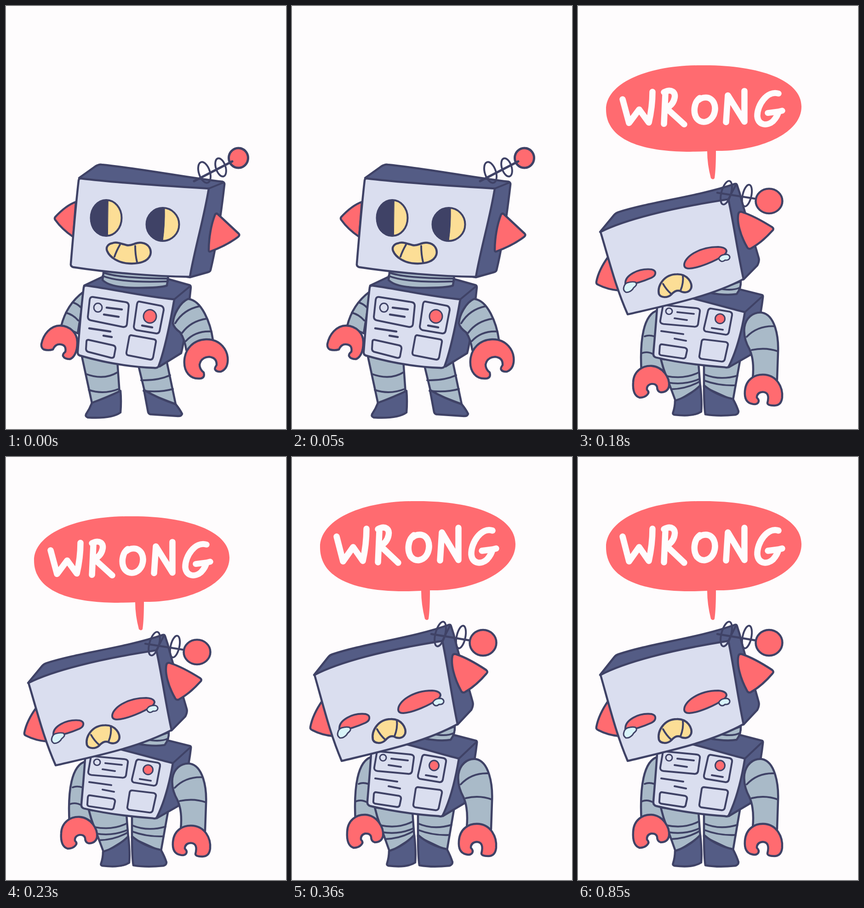
Write an HTML page that moves like this. It is 609 px wide and 920 px high and loops after 1.17 s.

```html
<!DOCTYPE html>
<html lang="en">
<head>
<meta charset="utf-8">
<title>Wrong robot</title>
<style>
html, body { margin: 0; width: 100%; height: 100%; overflow: hidden; background: #fefcfd; }
svg { display: block; width: 100%; height: 100%; }
</style>
</head>
<body>
<svg id="stage" viewBox="0 0 609 920" stroke-linecap="round" stroke-linejoin="round"></svg>
<script>
const ink = '#3f4266', navy = '#545c85', pale = '#dadeef', steel = '#a9bac8',
      red = '#ff6b70', yellow = '#fcde96', tear = '#d9f4f9', paper = '#fefcfd';

const shape = (fill, d, w = 4.5) => `<path d="${d}" fill="${fill}" stroke="${ink}" stroke-width="${w}"/>`;
const line = (d, w = 4) => shape('none', d, w);
const oval = (fill, x, y, rx, ry, tilt = 0, w = 4) =>
  `<ellipse cx="${x}" cy="${y}" rx="${rx}" ry="${ry}" transform="rotate(${tilt} ${x} ${y})" fill="${fill}" stroke="${ink}" stroke-width="${w}"/>`;

const happyLegs = [
  shape(steel, 'M165 762L187 864L247 842L242 770Z'),
  line('M173 800Q212 815 242 797M180 835Q212 846 245 833'),
  shape(navy, 'M187 863Q220 851 249 837Q251 860 249 884Q230 898 178 895Q172 893 174 888Q182 876 187 863Z'),
  shape(steel, 'M288 782L302 840L369 866L350 775Z'),
  line('M294 814Q331 815 357 803M299 837Q335 841 363 833'),
  shape(navy, 'M300 835Q332 854 369 866Q378 877 383 887Q382 892 374 892L314 888Q310 887 309 883Z')
];

const happyBody = [
  shape(steel, 'M168 622C144 640 128 664 120 696L156 712L166 650Z'),
  line('M146 645Q156 648 163 656M130 667Q146 671 157 684'),
  shape(red, 'M82 747Q76 743 77 735C81 715 96 695 118 695C140 696 156 712 155 733C155 752 148 765 139 768Q127 768 124 761Q123 757 129 752Q132 738 119 736Q108 734 102 747Q92 750 82 747Z'),
  shape(navy, 'M170 608L208 590L353 594L399 607Q402 608 402 612C398 650 390 720 381 755L334 784L160 760Z'),
  shape(steel, 'M213 572L210 596C225 611 260 613 290 613Q335 613 350 608L353 586Z'),
  line('M212 580Q245 592 353 593M210 587Q250 603 352 599'),
  shape(pale, 'M174 608C240 617 300 632 366 638C357 690 346 745 332 783Q330 788 322 787C270 785 215 776 160 760Q155 758 156 751C160 700 164 650 169 612Q170 608 174 608Z'),
  line('M366 638L401 609'),
  line('M190 633L260 644Q267 645 267 652L263 692Q262 699 254 698L186 684Q178 683 178 676L182 639Q183 632 190 633Z'),
  line('M291 643L337 652Q343 654 343 661L334 707Q332 713 326 712L284 705Q278 703 278 697L285 648Q286 642 291 643Z'),
  line('M179 726L233 738Q239 740 238 746L235 762Q234 766 228 765L178 752Q174 750 174 746L175 730Q175 726 179 726Z'),
  line('M272 716L322 725Q327 726 326 731L320 764Q318 770 313 769L267 760Q261 759 262 753L268 720Q269 716 272 716Z'),
  line('M219 656L252 660M213 671L245 676M296 695L318 699M181 701L227 708M212 717L230 720', 4.5),
  oval('none', 200, 656, 9, 9.5, 0, 3),
  oval(red, 313, 675, 14, 14.5, 0, 3),
  shape(steel, 'M363 690C364 672 378 645 396 637C426 640 445 690 450 726L392 748Q389 726 379 710Q365 700 363 690Z'),
  line('M368 690Q386 660 421 653M383 711Q402 685 437 680M391 729Q412 706 447 708'),
  shape(red, 'M424 810C400 813 386 795 388 770C390 745 408 726 435 725C465 724 485 748 482 775Q480 790 468 795Q458 796 455 791Q453 788 458 781Q459 765 442 763Q424 764 421 780Q421 790 430 797Q433 808 424 810Z')
];

const happyHead = [
  shape(red, 'M152 426Q130 434 107 459Q105 462 107 465Q122 486 146 502Z'),
  shape(navy, 'M159 374L194 349Q202 344 208 345C300 354 390 373 471 382Q476 384 475 389C468 450 458 520 445 574Q444 578 439 579L400 590L200 560Z'),
  shape(pale, 'M162 375C220 382 340 391 441 397C431 460 410 530 400 589C320 588 225 580 146 568Q140 566 141 560C146 500 152 430 158 379Q159 375 162 375Z'),
  line('M441 397L473 384'),
  oval(yellow, 218, 461, 33.5, 39, 0, 0),
  shape(ink, 'M222 422C196 418 184 443 184 464C184 487 199 502 221 499Z', 1),
  oval('none', 218, 461, 33.5, 39),
  oval(yellow, 341, 475, 35.5, 36, 0, 0),
  shape(ink, 'M345 439C318 437 306 458 306 475C306 496 321 511 341 511Q346 475 345 439Z', 1),
  oval('none', 341, 475, 35.5, 36),
  shape(yellow, 'M231 516C240 512 250 517 262 520C275 523 280 513 295 515C311 517 317 530 314 541C309 556 290 561 268 560C245 559 226 547 220 533C216 523 224 517 231 516Z'),
  line('M248 519Q240 533 236 545M281 522Q281 540 285 557'),
  shape(red, 'M455 453Q458 450 461 453L506 495Q509 498 505 502Q480 521 444 534Q441 535 441 531C441 505 446 475 455 453Z'),
  oval('none', 431.5, 362, 12, 23.5, -18),
  oval('none', 467, 351, 10.5, 20.5, -18),
  oval(red, 505.5, 330.5, 21, 21.5, 0, 5),
  line('M409 381L492 338', 5)
];

const sadLegs = [
  shape(steel, 'M178 762L213 860L266 826L262 772Z'),
  line('M192 801Q232 809 262 793M196 816Q232 822 263 808M203 831Q238 830 265 813'),
  shape(navy, 'M211 857Q242 847 266 822Q270 860 268 882Q250 894 210 889Q205 888 207 883Q211 870 211 857Z'),
  shape(steel, 'M274 776L274 826L337 856L352 768Z'),
  line('M274 797Q308 812 347 800M274 811Q308 824 343 822'),
  shape(navy, 'M274 822Q300 845 337 853Q345 868 349 881Q349 887 342 889Q305 893 277 888Q274 870 274 822Z')
];

const sadBody = [
  shape(steel, 'M174 652C142 660 134 720 138 792L188 792L180 762Z'),
  line('M145 711Q154 707 166 711M139 749Q151 744 165 752'),
  shape(red, 'M134 850Q118 845 120 815C121 790 140 777 160 778C185 780 200 805 198 824Q195 838 180 838Q172 836 172 826Q170 818 159 819Q149 822 150 832Q156 838 151 843Q145 850 134 850Z'),
  shape(navy, 'M180 620L350 604L400 617Q403 618 402 623C398 660 386 720 375 753L328 781L200 740Z'),
  shape(steel, 'M285 612L354 586Q355 602 345 615Q322 619 285 612Z'),
  line('M305 602Q335 609 353 600'),
  shape(pale, 'M174 610C230 616 300 640 363 656C355 705 342 750 328 779Q326 783 319 781C265 777 215 770 170 759Q163 757 164 749C167 710 172 660 174 610Z'),
  line('M363 656L401 620'),
  line('M185 640L258 647Q266 648 265 655L261 684Q259 690 252 689L186 683Q178 682 179 675Z'),
  line('M290 648L330 655Q336 657 335 663L328 702Q326 708 320 707L278 700Q273 698 274 692L283 652Q285 647 290 648Z'),
  line('M182 729L233 737Q238 739 237 744L234 758Q232 762 227 761L181 754Q176 753 177 748L178 733Q179 729 182 729Z'),
  line('M274 718L322 724Q327 726 326 731L319 764Q317 769 311 768L268 762Q263 760 264 755L269 722Q270 718 274 718Z'),
  line('M216 656L252 660M210 670L237 674M291 692L315 696M181 699L229 706M210 716L235 721'),
  oval('none', 198, 654, 7, 7, 0, 3),
  oval(red, 309, 671, 10.5, 11, 0, 3),
  shape(steel, 'M362 690C365 670 380 655 400 657C428 662 437 710 435 750L433 810L380 806Q384 765 373 740Q359 715 362 690Z'),
  line('M367 712Q390 687 426 688M378 742Q408 735 435 745'),
  shape(red, 'M378 864Q361 860 363 835C365 808 385 796 407 798C432 801 446 825 444 850Q442 868 427 868Q412 868 412 862Q418 838 402 837Q389 838 389 850Q395 856 392 861Q388 867 378 864Z')
];

const sadHead = [
  shape(red, 'M66 530Q45 560 40 587Q39 592 44 594Q65 605 90 607Z'),
  shape(navy, 'M48 474L79 435Q82 431 88 429C160 405 260 394 341 365Q345 364 346 368L352 387C362 430 380 485 393 533Q395 540 390 550L360 582L180 540Z'),
  shape(pale, 'M49 474C100 447 200 420 327 400C338 450 347 520 360 581C290 620 200 639 108 661C82 600 68 540 49 474Z'),
  line('M327 400L344 366'),
  shape(red, 'M103 590C103 573 130 556 160 559C172 562 170 573 160 578C140 587 125 592 108 594Q102 594 103 590Z', 4),
  shape(red, 'M231 549C231 532 262 508 305 508C322 509 328 517 318 526C300 540 262 556 242 557Q231 557 231 549Z', 4),
  shape(tear, 'M108 589Q118 586 125 588Q130 593 124 598Q120 601 119 604Q112 612 104 611Q97 606 100 598Q102 591 108 589Z', 3),
  shape(tear, 'M308 531Q312 525 324 525Q331 527 330 533Q328 539 320 538Q313 544 308 538Q305 534 308 531Z', 3),
  shape(yellow, 'M176 615C172 595 188 570 215 570C238 569 250 590 246 602C241 614 228 612 222 608C214 605 208 610 203 616C195 624 180 624 176 615Z'),
  line('M228 572Q230 590 223 607M185 592Q192 605 202 614'),
  shape(red, 'M349 432Q351 427 357 429Q384 438 422 463Q427 467 423 471Q400 498 375 512Q370 513 368 509C352 480 345 450 349 432Z'),
  oval('none', 322.5, 385, 10.5, 27.5, 15),
  oval('none', 367.5, 391.5, 9.5, 25, 12),
  line('M303 385L387 399', 4.5),
  oval(red, 415.5, 404, 29, 28, 0, 4.5)
];

const bubble = `
  <path fill="${red}" d="M61 196C61 137 150 96 265 96C390 94 487 128 486 190C486 250 395 292 300 290Q300 330 297 352Q294 357 289 352Q281 320 281 291C172 297 61 279 61 196Z"/>
  <g role="img" aria-label="WRONG" fill="none" stroke="${paper}" stroke-width="13.5">
    <path d="M97 173L111 227L133 196L154 226Q162 190 162 156"/>
    <path d="M190 161L187 229M187 157C203 148 213 157 210 170Q207 186 192 193L231 230"/>
    <path d="M265 170C252 180 250 203 258 216C268 230 287 226 295 209C303 188 294 169 278 169Q268 169 262 175"/>
    <path d="M322 225L326 164L362 224L362 154"/>
    <path d="M436 160C412 152 389 186 390 212C392 233 412 234 424 223Q434 212 436 201L413 204M436 201L444 199"/>
  </g>`;

const poses = {
  happy: [...happyLegs, ...happyBody, ...happyHead].join(''),
  sad: [...sadLegs, ...sadBody, ...sadHead, bubble].join('')
};
const stage = document.getElementById('stage');
stage.innerHTML = Object.entries(poses).map(([id, art]) => `<g id="${id}">${art}</g>`).join('');

// Each step holds a pose, stretched upward from the feet.
const steps = [
  { until: 90, pose: 'happy', stretch: 1 },
  { until: 180, pose: 'happy', stretch: 1.028 },
  { until: 270, pose: 'sad', stretch: 0.9585 },
  { until: 360, pose: 'sad', stretch: 1.012 },
  { until: 1170, pose: 'sad', stretch: 1 }
];
const loop = 1170, floor = 892;

function draw(ms) {
  const { pose, stretch } = steps.find(s => ms % loop < s.until);
  for (const g of stage.children) {
    g.style.display = g.id === pose ? '' : 'none';
    g.setAttribute('transform', `translate(0 ${floor * (1 - stretch)}) scale(1 ${stretch})`);
  }
}

const start = performance.now();
function tick() {
  draw(performance.now() - start);
  requestAnimationFrame(tick);
}
tick();
</script>
</body>
</html>
```
